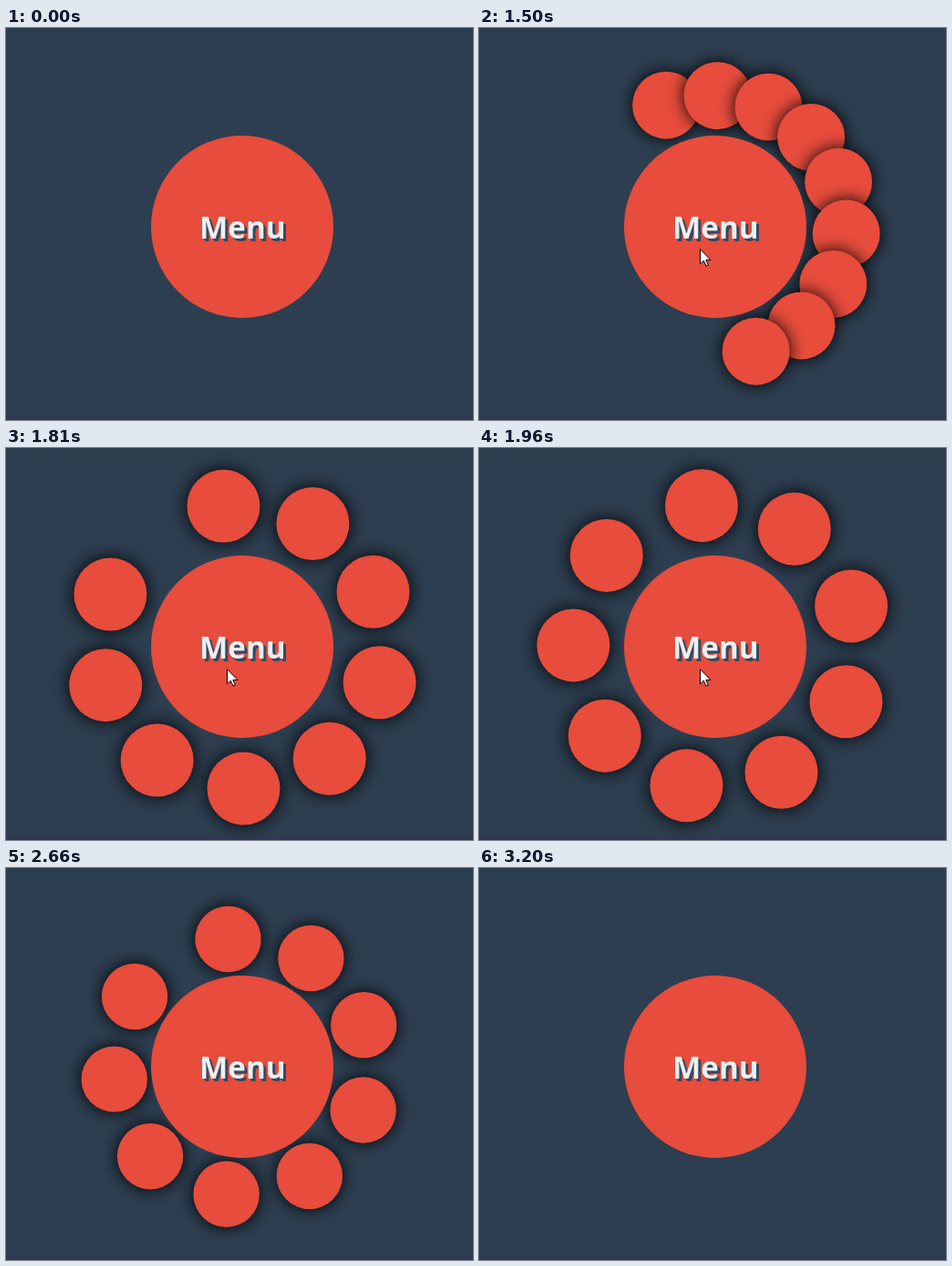
Animation of 512x430 px, one loop 3660 ms. Source, as an HTML page:

```html
<!DOCTYPE html>
<html lang="en">
<head>
<meta charset="utf-8">
<title>Radial menu</title>
<style>
  html, body { margin: 0; width: 100%; height: 100%; overflow: hidden; background: #2d3e50; }
  svg { display: block; width: 100%; height: 100%; }
  text { font: bold 33.2px "Open Sans", "Noto Sans", sans-serif; }
</style>
</head>
<body>
<svg viewBox="0 0 512 430">
  <defs>
    <filter id="shade" x="-100%" y="-100%" width="300%" height="300%">
      <feGaussianBlur stdDeviation="10"/>
    </filter>
    <g id="item">
      <circle r="40" filter="url(#shade)"/>
      <circle r="40" fill="#e74c3c"/>
    </g>
  </defs>
  <rect width="512" height="430" fill="#2d3e50"/>
  <rect y="426" width="512" height="4" fill="#30394f"/>
  <g id="items"></g>
  <circle cx="259" cy="218" r="100" fill="#e74c3c"/>
  <text x="215" y="234" fill="#34495e">Menu</text>
  <text x="212" y="231" fill="#ecf0f1">Menu</text>
  <path id="cursor" d="M.5 .7V16.9L4.3 13.2L7 19.1L9.3 18.1L6.8 12.4H11.9Z" fill="#fff" stroke="#000"/>
</svg>
<script>
  const LOOP = 3660, COUNT = 9, REACH = 155.6;
  const OPENING = [[1200, 0], [1500, .3315], [1650, .517], [1960, .846], [2120, 1]];
  const CLOSING = [[2610, 0], [3610, 1]];
  const PAUSES = [[1170, 1230], [1650, 1710], [2660, 2710]];
  const CURSOR_IN = [[1190, 0], [1340, 1]];
  const CURSOR_OUT = [[2470, 0], [2650, 1]];

  const group = document.getElementById("items");
  const cursor = document.getElementById("cursor");
  const items = Array.from({ length: COUNT }, () => {
    const el = document.createElementNS("http://www.w3.org/2000/svg", "use");
    el.setAttribute("href", "#item");
    return group.appendChild(el);
  });

  // Piecewise linear progress through [time, value] points
  function along(points, t) {
    if (t <= points[0][0]) return points[0][1];
    for (let i = 1; i < points.length; i++) {
      const [t0, v0] = points[i - 1], [t1, v1] = points[i];
      if (t < t1) return v0 + (v1 - v0) * (t - t0) / (t1 - t0);
    }
    return points[points.length - 1][1];
  }

  // cubic-bezier(.25, .1, .25, 1)
  function ease(x) {
    if (x <= 0) return 0;
    if (x >= 1) return 1;
    let lo = 0, hi = 1;
    for (let i = 0; i < 24; i++) {
      const u = (lo + hi) / 2;
      if (.75 * u * (1 - u) + u ** 3 < x) lo = u; else hi = u;
    }
    return .3 * lo * (1 - lo) ** 2 + 3 * lo * lo * (1 - lo) + lo ** 3;
  }

  // Scaling runs twice as fast as fanning out
  function placeItems(t) {
    const closing = t >= CLOSING[0][0];
    const p = along(closing ? CLOSING : OPENING, t);
    const state = x => closing ? 1 - ease(x) : ease(x);
    const step = 40 * state(p);
    const scale = state(2 * p);
    group.setAttribute("visibility", scale > .3 ? "visible" : "hidden");
    items.forEach((el, i) => {
      const angle = (-135 + (i + 1) * step) * Math.PI / 180;
      const x = 259 + REACH * scale * Math.cos(angle);
      const y = 218 + REACH * scale * Math.sin(angle);
      el.setAttribute("transform", `translate(${x} ${y}) scale(${scale})`);
    });
  }

  function placeCursor(t) {
    const enter = 1 - (1 - along(CURSOR_IN, t)) ** 2;
    const leave = along(CURSOR_OUT, t) ** 2;
    const x = 246 - 4 * enter;
    const y = 387 - 145 * enter + 145 * leave;
    cursor.setAttribute("visibility", t >= 1170 && t < 2650 ? "visible" : "hidden");
    cursor.setAttribute("transform", `translate(${x} ${y})`);
  }

  function render(t) {
    const pause = PAUSES.find(([from, to]) => t >= from && t < to);
    if (pause) t = pause[0];
    placeItems(t);
    placeCursor(t);
  }

  const start = performance.now();
  function tick() {
    render((performance.now() - start) % LOOP);
    requestAnimationFrame(tick);
  }
  tick();
</script>
</body>
</html>
```
